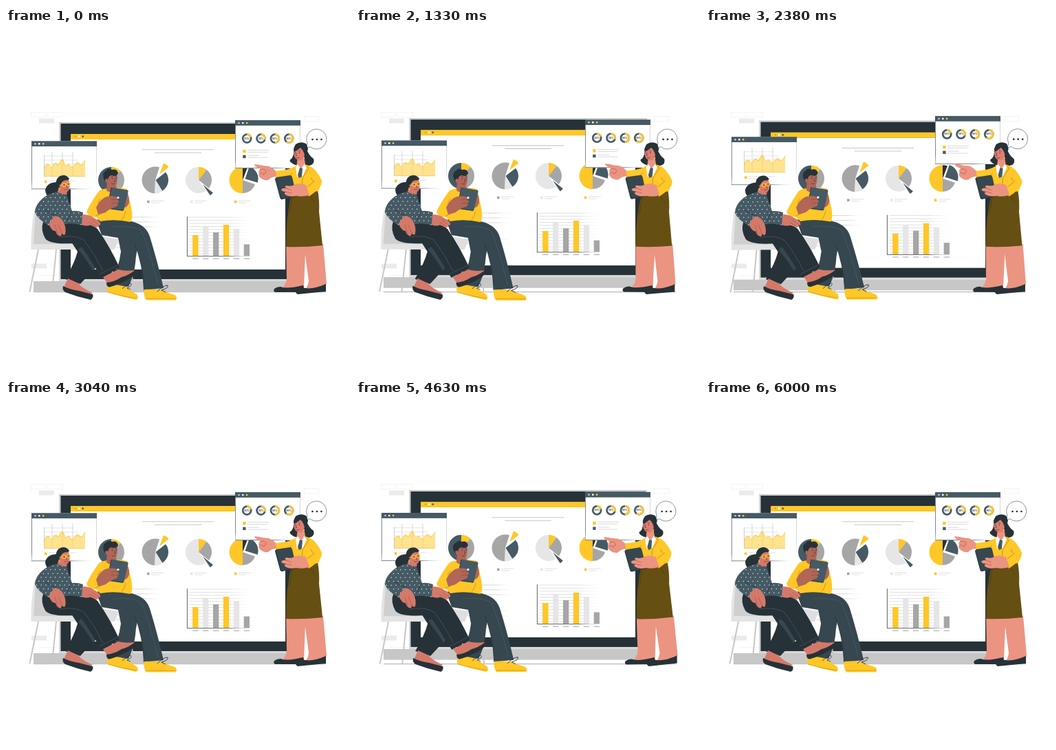
Animation, 500 px wide and 500 px high, one loop 6040 ms. Source, as an HTML page with a canvas:

```html
<!DOCTYPE html>
<html lang="en">
<head>
<meta charset="utf-8">
<title>Presentation</title>
<style>
html, body { margin: 0; width: 100%; height: 100%; overflow: hidden; background: #fff; }
canvas { display: block; width: 100vw; height: 100vh; }
</style>
</head>
<body>
<canvas id="stage"></canvas>
<script>
const LOOP = 6040, TAU = Math.PI * 2;
const INK = '#263238', SLATE = '#455a64', DENIM = '#37474f', YELLOW = '#ffc727';
const GRAY = '#a6a6a6', MID = '#c7c7c7', PALE = '#e6e6e6', WHITE = '#fff';
const SKIN_A = '#d4796a', SKIN_B = '#b16657', SKIN_C = '#eb9481';

const canvas = document.getElementById('stage');
const ratio = window.devicePixelRatio || 1;
canvas.width = canvas.height = 500 * ratio;
const c = canvas.getContext('2d');

function box(x, y, w, h, color) {
  c.fillStyle = color;
  c.fillRect(x, y, w, h);
}
function frame(x, y, w, h, color) {
  c.strokeStyle = color;
  c.lineWidth = 0.7;
  c.strokeRect(x, y, w, h);
}
function line(x1, y1, x2, y2, color, width = 0.7) {
  c.strokeStyle = color;
  c.lineWidth = width;
  c.beginPath();
  c.moveTo(x1, y1);
  c.lineTo(x2, y2);
  c.stroke();
}
function dot(x, y, r, color) {
  c.fillStyle = color;
  c.beginPath();
  c.arc(x, y, r, 0, TAU);
  c.fill();
}
function oval(x, y, rx, ry, tilt, color) {
  c.fillStyle = color;
  c.beginPath();
  c.ellipse(x, y, rx, ry, tilt, 0, TAU);
  c.fill();
}
function shape(d, color) {
  c.fillStyle = color;
  c.fill(new Path2D(d));
}
function stroke(d, color = INK, width = 0.7) {
  c.strokeStyle = color;
  c.lineWidth = width;
  c.stroke(new Path2D(d));
}
// Angles in degrees, clockwise from twelve o'clock.
const rad = a => (a - 90) * Math.PI / 180;
function slice(x, y, r, from, to, color, out = 0) {
  const m = rad((from + to) / 2);
  const px = x + out * Math.cos(m), py = y + out * Math.sin(m);
  c.fillStyle = color;
  c.beginPath();
  c.moveTo(px, py);
  c.arc(px, py, r, rad(from), rad(to));
  c.fill();
}
function fade(x1, y1, x2, y2, color) {
  const g = c.createLinearGradient(x1, y1, x2, y2);
  g.addColorStop(0, color);
  g.addColorStop(0.6, color);
  g.addColorStop(1, 'rgba(255,255,255,0)');
  return g;
}
function moved(dx, dy, draw) {
  c.save();
  c.translate(dx, dy);
  draw();
  c.restore();
}
function turned(x, y, angle, draw) {
  c.save();
  c.translate(x, y);
  c.rotate(angle);
  c.translate(-x, -y);
  draw();
  c.restore();
}

function backdrop() {
  frame(36.5, 122.5, 21, 7, '#f0f0f0');
  frame(60.5, 122.5, 22, 7, '#f0f0f0');
  box(48, 131.5, 22, 7, '#ebebeb');
  frame(433.5, 128.5, 21, 7.5, '#ededed');
  box(37, 342.5, 22, 7, '#ebebeb');
  line(48, 359.5, 76, 359.5, '#efefef');
}

function pies() {
  slice(153, 221, 19, 0, 45, YELLOW);
  slice(153, 221, 19, 45, 165, GRAY);
  slice(153, 221, 19, 165, 360, SLATE);

  slice(217, 221, 19.5, 182, 378, GRAY);
  slice(217, 221, 19.5, 148, 182, PALE);
  slice(217.5, 221, 18.5, 52, 148, SLATE);
  slice(217, 221, 17, 20, 52, YELLOW, 10.5);

  slice(280, 221, 19, 146, 360, PALE);
  slice(280, 221, 19, 0, 37, YELLOW);
  slice(280, 221, 19, 37, 129, GRAY);
  slice(281, 222, 19, 129, 146, SLATE, 7.5);

  slice(344, 221, 19.5, 180, 360, YELLOW);
  slice(344, 221, 19.5, 0, 21, INK);
  slice(344, 221, 19, 109, 180, GRAY);
  slice(344, 221, 19, 19, 107, SLATE, 4);

  [[205, GRAY], [268, PALE], [331.8, YELLOW]].forEach(([x, color]) => {
    box(x, 250.7, 3.6, 3.6, color);
    line(x + 6, 251.2, x + 24, 251.2, '#d2d2d2');
    line(x + 6, 254, x + 18, 254, '#d2d2d2');
  });
}

function barChart() {
  const soft = fade(264, 0, 365, 0, '#d0d0d0');
  for (let i = 0; i < 13; i++) box(267, 274.7 + i * 4.45, 98, 0.65, soft);
  const tops = [301, 289, 297, 286, 292, 314.5];
  const tints = [YELLOW, PALE, GRAY];
  tops.forEach((y, i) => {
    const x = 271.2 + i * 14.9;
    box(x, y, 8.3, 331.5 - y, tints[i % 3]);
    line(x, 335.3, x + 8.3, 335.3, '#777');
  });
  box(262.9, 274, 1.1, 58, '#707070');
  box(263, 331.2, 101, 1, fade(263, 0, 364, 0, '#666'));
}

function screen() {
  box(40, 368, 392, 15.7, MID);
  box(77, 137, 346, 231, '#d8d8d8');
  box(77, 137, 346, 1.5, MID);
  box(79.5, 139, 341.5, 226, INK);
  box(94, 154, 312, 8, YELLOW);
  dot(101, 157.7, 1.3, '#dba51b');
  dot(106.3, 157.7, 1.4, WHITE);
  dot(111.7, 157.7, 1.4, SLATE);
  box(94, 162, 312, 189, WHITE);
  line(198, 176.8, 302, 176.8, MID, 1.1);
  line(216, 181.3, 284, 181.3, MID, 1.1);
  pies();
  const soft = fade(160, 0, 233, 0, '#cfcfcf');
  [274.5, 281.5, 288.5, 312, 319].forEach((y, i) => box(160, y, i > 2 ? 72 : 70, 0.8, soft));
  barChart();
}

function pane(x, y, w, h) {
  box(x, y, w, h, WHITE);
  box(x, y + 7, 0.8, h - 7, fade(0, y, 0, y + h + 25, '#60686c'));
  box(x + w - 0.6, y + 7, 0.6, h - 7, fade(0, y, 0, y + h, '#bbb'));
  box(x, y + h - 0.8, w, 0.8, fade(x, 0, x + w, 0, '#60686c'));
  box(x, y, w, 7.8, SLATE);
  [MID, WHITE, YELLOW].forEach((color, i) => dot(x + 5.5 + i * 5.8, y + 4, 1.35, color));
}

function areaPane() {
  pane(37, 164.3, 95, 70);
  for (let i = 0; i < 3; i++) {
    line(56, 186 + i * 6, 98 + i * 7, 186 + i * 6, '#d5d5d5', 0.6);
    line(67 + i * 15, 180, 67 + i * 15, 215, '#bdbdbd', 0.6);
  }
  const crest = 'M55.5 206L56 202Q60 196 63 199Q66 205 68 201Q70 195 74 197Q76 201 78 196Q82 187 84 194Q85 202 88 200Q91 196 93 200Q96 205 100 199Q104 193 107 198Q110 202 115 192';
  shape(crest + 'L115 215.5H55.5Z', 'rgba(255,210,75,.62)');
  stroke(crest, YELLOW, 0.9);
  line(55.5, 185, 55.5, 216, '#bbb', 0.7);
  line(55, 215.7, 115, 215.7, '#e6bd48', 0.7);
  box(56, 221.5, 3.6, 3.6, YELLOW);
  line(62, 222, 101, 222, '#d2d2d2');
  line(62, 225, 87, 225, '#d2d2d2');
}

function ringPane() {
  pane(333, 134, 95, 70);
  c.textAlign = 'center';
  c.textBaseline = 'middle';
  c.font = '700 3.2px Inter, sans-serif';
  [20, 30, 50, 60].forEach((n, i) => {
    const x = 350.2 + i * 20.35, y = 160.6;
    c.lineWidth = 2.7;
    c.strokeStyle = SLATE;
    c.beginPath();
    c.arc(x, y, 6, 0, TAU);
    c.stroke();
    c.strokeStyle = YELLOW;
    c.beginPath();
    c.arc(x, y, 6, rad(0), rad(n * 3.6));
    c.stroke();
    c.fillStyle = INK;
    c.fillText(n + '%', x, y);
  });
  [[177, YELLOW, 382, 380], [184.7, SLATE, 368, 380]].forEach(([y, color, a, b]) => {
    box(344.2, y, 4.4, 4.4, color);
    line(351, y + 0.6, a, y + 0.6, MID);
    line(351, y + 3.5, b, y + 3.5, MID);
  });
}

function bubble() {
  c.lineJoin = 'round';
  const d = 'M438.2 167.2A14.5 14.5 0 1 1 442.2 172.6Q439.5 174.2 435.5 174.3Q438.7 171.6 438.2 167.2Z';
  shape(d, WHITE);
  stroke(d, '#58636a', 0.7);
  [445.8, 452.2, 458.7].forEach(x => dot(x, 162, 1.35, INK));
}

function chairs() {
  [[47, 322, 34.5, 383.5], [73, 322, 67, 383.5], [152, 322, 157, 383.5], [178, 320, 186, 383.5]]
    .forEach(p => line(...p, MID, 2));
  shape('M132 302L164 307L158 322H118Z', '#dedede');
  shape('M41 265Q36 292 36.5 322H108L107 306L54 304V266Q46 263 41 265Z', '#e3e3e3');
  shape('M43 268L40 314H104L102 308L56 306L53 268Z', '#cfcfcf');
}

function sitterB() {
  // far leg and shoe
  shape('M162 300L196 304Q189 324 188 342Q186 360 178 376L151 373Q164 350 167 325Z', DENIM);
  shape('M149 373Q161 372 176 377Q181 382 190 387Q194 393 189 395Q165 390 147.5 384Q145 379 149 373Z', YELLOW);
  stroke('M148 384Q168 390 190 393', '#c99412', 0.7);
  stroke('M169 379Q177 372 181 371Q185 374 176 378L181 380', INK, 0.8);
  // near leg and shoe
  shape('M131 279Q150 274 177 280Q203 284 209 303Q220 339 229 378L200 381Q199 344 187 313Q182 306 163 305L139 301Z', DENIM);
  stroke('M187 313Q198 343 201 373', INK, 0.6);
  stroke('M155 289Q181 286 196 294Q205 311 221 373', '#53646c', 0.5);
  shape('M201 380Q214 379 226 381Q236 385 245 388Q250 391 247 395.5H204Q199 389 201 380Z', YELLOW);
  stroke('M203 393.3H247', '#c99412', 0.7);
  stroke('M220 383Q229 374 235 374Q237 378 226 381L232 384', INK, 0.9);
  // sweater
  shape('M142 234Q135 235 131 243Q122 256 117 267Q119 274 131 275L137 281Q158 277 181 282Q185 276 182 261L176 234Q162 230 142 234Z', YELLOW);
  stroke('M130 273Q143 269 151 262M168 279Q173 273 174 266M137 248L133 255', '#a87c13', 0.6);
  // head
  shape('M147 222L146 236Q154 243 161 234L159 224Z', SKIN_B);
  shape('M146 211L160 208Q164 218 160 229Q156 233 149 228Q144 222 146 211Z', SKIN_B);
  shape('M142 219Q139 210 146 207Q148 203 154 206Q161 204 163 211Q160 217 154 214Q149 214 148 221L145 224Z', INK);
  oval(146.5, 222, 2, 3, -0.2, SKIN_B);
  dot(154.5, 218.5, 0.7, INK);
  dot(160, 218, 0.7, INK);
  stroke('M153 216L156 215M158.7 215L161 216M157.5 219L159 223H157M153.5 226Q156 228 158.5 226', INK, 0.6);
  // tablet and hands
  shape('M172 237Q180 241 179 254Q176 262 170 261Z', SKIN_B);
  shape('M153 231.5L176.5 235.5Q178 236 177.5 238L171.5 264Q171 266 169 265.7L147 262.5Z', SLATE);
  stroke('M153 232L147 262L170 265', INK, 0.8);
  shape('M131 261Q136 250 144 246Q151 243 159 245Q164 247 162 250Q166 252 162 255Q164 258 159 260Q150 263 145 268L134 271Z', SKIN_B);
  stroke('M153 250Q159 248 163 250M153 255Q159 253 163 255', '#84463a', 0.6);
  dot(163, 246.5, 1.6, WHITE);
}

function sitterA() {
  // lower leg, shoe
  shape('M95 311L122 314L133 345L108 372L86 365Q100 341 104 325Z', INK);
  shape('M112 315Q119 324 130 349L127 353Q116 335 105 322Z', DENIM);
  shape('M90 364L105 371Q110 378 126 385L118 389Q100 384 84 377Z', SKIN_A);
  shape('M83 375Q92 380 106 382Q117 385 126 387Q128 392 123 395Q104 391 86 384Q81 380 83 375Z', INK);
  // crossed leg
  shape('M141 362L163 351Q174 354 187 352Q184 358 174 362L148 372Z', SKIN_A);
  shape('M146 370Q158 369 168 362Q177 360 187 352.5Q189 357 183 362Q169 371 151 376.5Q146 377 146 370Z', INK);
  shape('M54 282Q50 293 57 306Q64 315 99 313Q108 314 115 325L139 363L165 348Q150 316 133 292Q126 285 110 284L84 281Z', INK);
  stroke('M136 358L162 345M78 304Q102 300 114 309Q130 330 141 353', '#53646c', 0.6);
  // hair, neck, blouse
  shape('M75 224Q60 224 57 235Q57 244 66 247Q70 255 79 249Z', INK);
  shape('M77 231L74 241Q80 247 89 241L87 234Z', SKIN_A);
  const blouse = 'M74 238Q61 241 54 247Q42 257 42 268Q47 279 62 287L87 285Q98 283 111 287L112 268Q103 265 96 266L88 242Q82 242 74 238Z';
  shape(blouse, SLATE);
  c.save();
  c.clip(new Path2D(blouse));
  for (let row = 0; row < 9; row++)
    for (let k = 0; k < 12; k++) dot(41 + k * 6.8 + row % 2 * 3.4, 241 + row * 5.6, 0.75, '#e9eef0');
  c.restore();
  stroke('M56 264Q64 270 74 273M95 266L89 280', INK, 0.7);
  // head and glasses
  shape('M76 221L89 218Q94 225 92 234Q89 241 82 239Q75 234 76 221Z', SKIN_A);
  shape('M74 235Q70 221 77 216Q86 211 92 219Q91 222 87 221Q80 222 78 231Z', INK);
  c.strokeStyle = YELLOW;
  c.lineWidth = 1;
  [[84.3, 228], [90.3, 226.8]].forEach(([x, y]) => {
    c.beginPath();
    c.arc(x, y, 2.6, 0, TAU);
    c.stroke();
    dot(x + 0.3, y, 0.65, INK);
  });
  line(77, 229, 82, 228, YELLOW, 0.8);
  stroke('M84 234.5Q87 236.5 90 233.7M88 229L89 231.5H87.5', '#762f2a', 0.6);
  dot(77.8, 234.5, 1, YELLOW);
  // hands
  shape('M111 271Q122 271 128 276Q135 279 137 284Q138 288 133 286Q136 290 130 290L123 286Q118 289 110 286Z', SKIN_A);
  stroke('M125 279L134 286M121 282L130 288', '#9c5147', 0.6);
  shape('M62 285Q65 279 71 273Q80 274 84 283Q88 291 86 300Q83 302 81 298Q81 304 77 302Q73 300 72 295Q67 296 62 285Z', SKIN_A);
  stroke('M76 286L81 298M71 286L75 299', '#9c5147', 0.6);
}

function speaker() {
  // legs and shoes
  shape('M407 315H435.5L433 376Q427 380 399 380Q407 374 408 365Z', SKIN_C);
  shape('M433 315L461 314L466 372Q458 380 434 381Q438 378 440 368Z', SKIN_C);
  shape('M390 379Q394 376 399 376Q407 380 432 374L435 384H391Q388 382 390 379Z', INK);
  shape('M423 380Q429 377 435 378Q447 380 465 372V383Q444 385 424 387Q419 385 423 380Z', INK);
  // skirt
  shape('M416 236L453 235Q456 252 455 267L460 316Q433 319 407 318Q406 278 416 236Z', '#664f12');
  stroke('M443 245Q447 252 450 254M416 246L412 270', '#463608', 0.6);
  // hair behind and neck
  shape('M421 169Q428 164 436 168Q439 172 438 179Q442 187 447 190Q449 196 444 199Q434 202 429 199Q421 201 415 196Q410 192 415 190Q419 185 418 176Z', INK);
  shape('M424 187L422 203L429 209L435 197L433 186Z', SKIN_C);
  // jacket
  shape('M423 199Q413 207 390 208L392 217L414 219L417 238Q435 241 454 237L459 225Q459 218 449 206Q443 200 434 198L428 210Z', YELLOW);
  shape('M421 202L424 198L429 205L434 197L437 202L431 216H423Z', WHITE);
  shape('M427 203L431 204L430 216L426 218L424 214Z', SLATE);
  stroke('M434 198L440 204L431 218L430 234M443 217L448 226M416 211L411 216', '#9b7413', 0.6);
  // face
  shape('M419 176Q424 170 433 172Q436 183 432 190Q428 195 421 190Q417 185 419 176Z', '#df7e70');
  shape('M419 180Q417 171 424 168Q433 164 439 175Q438 181 434 185Q433 179 428 174Q423 178 419 180Z', INK);
  dot(420.8, 181.5, 0.65, INK);
  dot(426.5, 181.5, 0.7, INK);
  stroke('M419.5 179L422 178.5M425 178.6L428 179M422 182L421 185.5H423M421.5 188.7Q424 190 426.5 188', INK, 0.6);
  dot(433.2, 189, 1, YELLOW);
  // pointing hand
  shape('M361.5 198.2Q366 198 373 200L382 201Q389 204 392 208L393 216Q386 216 381 221Q374 222 369 217Q366 214 368 211Q366 207 370 205L363 201.5Q360.5 199 361.5 198.2Z', SKIN_C);
  stroke('M369 206Q376 204 378 208Q378 212 374 212M368.5 211Q373 210 375 214', '#a84e43', 0.6);
  // tablet, holding arm
  shape('M393 217L413 214Q415 214 416 217L422 243Q422 245 420 245L402 249Q399 250 398 246L391 220Q391 218 393 217Z', DENIM);
  stroke('M392 219L400 248L421 245', INK, 0.7);
  shape('M459 221Q460 232 440 245L434 231L449 220Z', YELLOW);
  stroke('M438 231L449 222', '#9b7413', 0.6);
  shape('M436 228L441 243Q430 246 423 244Q411 246 406 242Q403 240 407 238Q401 238 400 235Q402 232 408 233Q403 230 408 229Q416 231 420 227Q427 225 436 228Z', SKIN_C);
  stroke('M407 233L415 236M406 238L415 240', '#a84e43', 0.6);
}

function paint(t) {
  const sway = n => Math.sin(TAU * n * t / LOOP);
  const lift = n => (1 - Math.cos(TAU * n * t / LOOP)) / 2;
  c.setTransform(ratio, 0, 0, ratio, 0, 0);
  box(0, 0, 500, 500, WHITE);
  backdrop();
  line(40, 383.7, 465, 383.7, '#8d9498', 0.8);
  moved(0, -6.1 * lift(2), screen);
  moved(0, -6.5 * lift(4), () => {
    areaPane();
    ringPane();
  });
  moved(0.9 * sway(1) + 1.3 * lift(4) - 0.3, -0.3 * lift(4), bubble);
  turned(125, 255, 0.009 * sway(2), () => {
    chairs();
    sitterB();
    sitterA();
  });
  turned(430, 262, 0.0145 * sway(1), speaker);
}

function tick() {
  paint(performance.now() % LOOP);
  requestAnimationFrame(tick);
}
tick();
</script>
</body>
</html>
```
